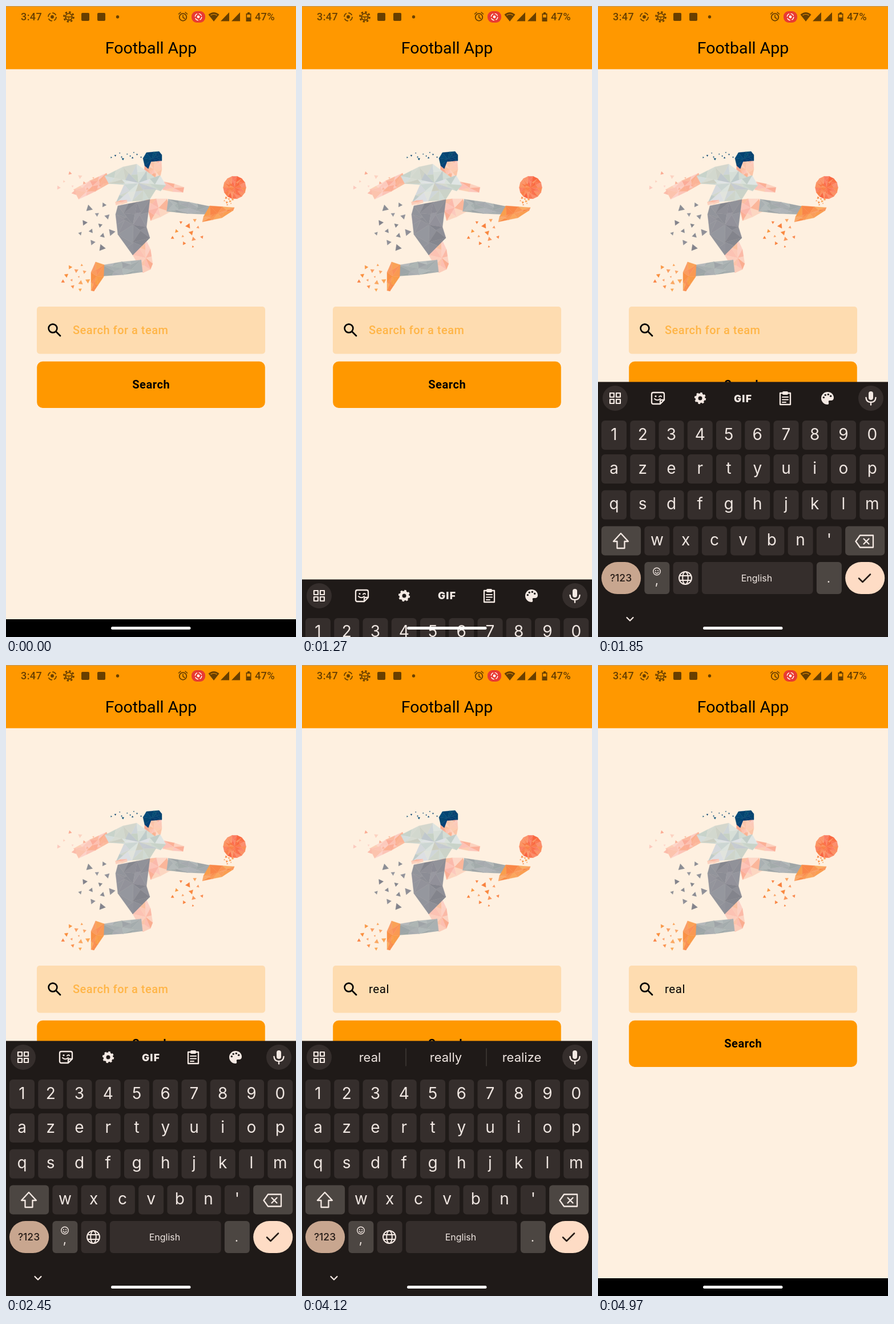
An HTML page that plays this animation: 508x1102 px, repeating every 5 s.

```html
<!DOCTYPE html>
<html lang="en">
<head>
<meta charset="utf-8">
<title>Football App</title>
<style>
html, body { margin: 0; width: 100%; height: 100%; overflow: hidden; background: #fef0e0; }
svg { display: block; width: 508px; height: 1102px; }
text { font-family: Roboto, sans-serif; white-space: pre; }
.kb text { font-family: Inter, sans-serif; fill: #efe6e1; text-anchor: middle; }
.kb .dark { fill: #251b16; }
.line { fill: none; stroke-linecap: round; stroke-linejoin: round; }
</style>
</head>
<body>
<svg id="stage" viewBox="0 0 508 1102"></svg>
<script>
const LOOP = 5000, KEYBOARD_HEIGHT = 446, SLIDE = 293, OPEN_AT = 1199, CLOSE_AT = 4510;
const INK = '#683f00', PALE = '#f4e9e3', KEY = '#352e2c', SPECIAL = '#4c4642', DARK = '#1f1a18';

const times = (n, make) => Array.from({ length: n }, (_, i) => make(i));
const rect = (x, y, w, h, r, fill) =>
  `<rect x="${x}" y="${y}" width="${w}" height="${h}" rx="${r}" fill="${fill}"/>`;
const disc = (x, y, r, fill) => `<circle cx="${x}" cy="${y}" r="${r}" fill="${fill}"/>`;
const ring = (x, y, r, color, width, dash = '') =>
  `<circle cx="${x}" cy="${y}" r="${r}" fill="none" stroke="${color}" stroke-width="${width}" stroke-dasharray="${dash}"/>`;
const line = (d, color, width) => `<path class="line" d="${d}" stroke="${color}" stroke-width="${width}"/>`;
const fill = (d, color) => `<path d="${d}" fill="${color}" fill-rule="evenodd"/>`;
const text = (x, y, size, str, attrs = '') => `<text x="${x}" y="${y}" font-size="${size}" ${attrs}>${str}</text>`;

let seed = 77;
const random = () => (seed = seed * 16807 % 2147483647) / 2147483647;
const vary = (value, spread) => value + (random() * 2 - 1) * spread;

// A tone is hue, saturation, lightness and hue spread.
const shade = ([h, s, l, spread]) => `hsl(${vary(h, spread)} ${s}% ${vary(l, l / 14)}%)`;
const SKIN = [16, 92, 83, 6], SHIRT = [140, 11, 83, 80], SHORTS = [235, 4, 57, 8], SOCK = [190, 5, 68, 20],
  SHOE = [25, 94, 65, 5], HAIR = [205, 94, 23, 4], BALL = [15, 95, 66, 5];

const polygon = (points, color) =>
  `<polygon points="${points.join(' ')}" fill="${color}" stroke="${color}" stroke-width=".4"/>`;

// Halves a triangle across its longest side until the facets are small.
function split([a, b, c], limit, tone) {
  const len = side => Math.hypot(side[0][0] - side[1][0], side[0][1] - side[1][1]);
  const [longest] = [[a, b, c], [b, c, a], [c, a, b]].sort((s, t) => len(t) - len(s));
  if (len(longest) < limit) return polygon([a, b, c], shade(tone));
  const [p, q, r] = longest, k = vary(0.5, 0.12);
  const m = [p[0] + (q[0] - p[0]) * k, p[1] + (q[1] - p[1]) * k];
  return split([p, m, r], limit, tone) + split([m, q, r], limit, tone);
}

function facets(tone, points, limit = 25) {
  const n = points.length;
  const hub = [0, 1].map(axis => points.reduce((sum, p) => sum + p[axis], 0) / n);
  return points.map((p, i) => split([hub, p, points[(i + 1) % n]], limit, tone)).join('');
}

const shape = str => str.split(' ').map(p => p.split(',').map(Number));
const blob = (x, y, r, n, turn = 0) => times(n, i =>
  [x + r * Math.cos(turn + i * 2 * Math.PI / n), y + r * Math.sin(turn + i * 2 * Math.PI / n)]);

// Tapered outline from one joint to the next, slightly swollen in the middle.
function limb(x1, y1, w1, x2, y2, w2) {
  const length = Math.hypot(x2 - x1, y2 - y1), nx = (y1 - y2) / length, ny = (x2 - x1) / length;
  const at = (k, side) => {
    const half = side * (w1 + (w2 - w1) * k + 10 * k * (1 - k)) / 2;
    return [x1 + (x2 - x1) * k + nx * half, y1 + (y2 - y1) * k + ny * half];
  };
  return [at(0, 1), at(0.5, 1), at(1, 1), at(1, -1), at(0.5, -1), at(0, -1)];
}

const shards = (tone, x, y, rx, ry, count, size) => times(count, i => {
  const angle = i * 2.4, spread = Math.sqrt((i + 0.5) / count);
  const center = [x + rx * spread * Math.cos(angle), y + ry * spread * Math.sin(angle)];
  return polygon(blob(...center, vary(size, size / 2), 3, random() * 6), shade(tone));
}).join('');

const player = () =>
  facets(SKIN, limb(180, 300, 18, 123, 329, 19)) +
  facets(SKIN, limb(276, 314, 14, 311, 321, 9)) +
  facets(SKIN, shape('243,278 251,272 272,268 273,285 270,299 262,302 242,291'), 16) +
  facets(SHIRT, shape('173,297 205,281 229,276 262,300 270,296 280,313 271,323 263,320 251,339 193,343 207,312 180,310'), 28) +
  facets(HAIR, shape('240,266 246,256 268,254 273,260 273,270 251,272 249,284 243,279'), 18) +
  facets(SKIN, limb(192, 345, 5, 212, 341, 4)) +
  facets(SKIN, limb(249, 357, 37, 285, 348, 23)) +
  facets(SKIN, shape('222,435 244,406 253,425 257,450 253,460 240,466')) +
  facets(SHORTS, shape('196,349 252,338 246,386 252,405 222,435 196,399 192,364'), 32) +
  facets(SOCK, limb(283, 348, 21, 356, 357, 14)) +
  facets(SHOE, shape('357,349 400,352 398,357 378,370 344,377 346,368')) +
  facets(SOCK, limb(170, 462, 19, 238, 454, 21)) +
  facets(SHOE, shape('157,447 172,452 171,473 154,498 149,497 149,465')) +
  facets(BALL, blob(400.5, 317, 20, 14), 18) +
  shards(HAIR, 211, 262, 31, 7, 11, 1.6) +
  shards(SKIN, 128, 309, 40, 22, 10, 3.2) +
  shards(SHORTS, 158, 383, 34, 42, 12, 4.5) +
  shards(SHOE, 318, 396, 32, 26, 12, 3.5) +
  shards(SHOE, 390, 341, 10, 7, 8, 1.6) +
  shards(SHOE, 122, 473, 27, 24, 12, 3.2);

const recordIcon = (x, y, size, color) =>
  disc(x, y, size * 0.42, color) + ring(x, y, size, color, size / 4, `${size * 1.1} ${size * 0.47}`);

const gear = (x, y, r, color, width) =>
  ring(x, y, r, color, width) + ring(x, y, r * 1.45, color, r / 2, r * 1.45 * Math.PI / 8);

const statusBar = () =>
  text(26, 25, 18, '3:47', `fill="${INK}" font-weight="500" letter-spacing=".4"`) +
  recordIcon(81, 19, 7, INK) +
  gear(110, 19, 5.8, INK, 1.8) + line('M104 19H116M110 19V25', INK, 1.3) +
  rect(132, 12, 14, 14, 2, INK) + rect(160, 12, 14, 14, 2, INK) + disc(195.5, 19, 2.7, INK) +
  ring(310, 19.5, 6.3, INK, 1.8) + line('M310 16V20L313 22M302.5 14L306 11M317.5 14L314 11', INK, 1.6) +
  rect(325, 9, 24, 20, 9, '#e83a32') + recordIcon(337, 19, 5.7, '#fff') +
  fill('M354.5 15Q364 7 373.5 15L364 27Z', INK) + line('M359 16Q364 13 369 16', '#ff9800', 1.2) +
  fill('M376 26.5L391 11V26.5ZM395 26.5L410 11V26.5Z', INK) +
  fill('M423 11H427V13H429.5V27H420.5V13H423ZM422.2 15V20H427.8V15Z', INK) +
  text(436, 25, 18.3, '47%', `fill="${INK}" font-weight="500" letter-spacing=".2"`);

const page = () =>
  rect(0, 0, 508, 1102, 0, '#fef0e0') + rect(0, 0, 508, 110.4, 0, '#ff9800') + rect(0, 0, 508, 1, 0, '#b99a6c') +
  statusBar() +
  text(254, 83, 28.5, 'Football App', 'text-anchor="middle"') +
  player() +
  rect(54, 525, 400, 82.5, 5, '#fedcb0') +
  ring(82, 563, 7.4, '#000', 2.6) + line('M88 569L95 576', '#000', 2.8) +
  '<g id="field"></g>' +
  rect(54.2, 620.7, 399.6, 81.2, 10, '#ff9800') +
  text(254.3, 668, 20, 'Search', 'font-weight="700" letter-spacing=".6" text-anchor="middle"') +
  rect(0, 1071, 508, 31, 0, '#000');

const column = i => 6 + 50.25 * i;
const rowTop = row => row ? 720.3 + 62.7 * row : 724;
const key = (col, row, span = 1, color = KEY, radius = 6) =>
  rect(column(col), rowTop(row), 50.25 * span - 6.25, row < 4 ? 51 : 56, radius, color);
const keyRow = (chars, row, first = 0) => [...chars].map((char, i) =>
  key(first + i, row) + text(column(first + i) + 22, rowTop(row) + 33.5, 28, char)).join('');

const sticker = () =>
  line('M97 675H113Q116 675 116 678V688L109 695H97Q94 695 94 692V678Q94 675 97 675ZM109 695V690Q109 688 111 688H116', PALE, 2.3) +
  disc(101, 681.5, 1.6, PALE) + line('M107 682.5Q109 680 111 682M99 686Q104 690.5 109 686', PALE, 2);
const clipboard = () =>
  line('M319 676H337V696H319Z', PALE, 2.3) + rect(323, 673, 10, 6, 2, PALE) +
  line('M323 683H333M323 687.5H333M323 692H329', PALE, 2);
const palette = () =>
  fill('M402 674A11 11 0 0 0 402 696Q405 696 404 692Q403 689 406 689H408Q413 689 413 684C413 678 408 674 402 674Z', PALE) +
  blob(402, 685, 6.8, 8, 0.2).slice(4).map(([x, y]) => disc(x, y, 1.7, DARK)).join('');

const tools = () =>
  sticker() + gear(179, 685, 6, PALE, 5) +
  text(254, 691.5, 17.5, 'GIF', 'font-weight="900" letter-spacing="1.2"') + clipboard() + palette();

const topEnds = () =>
  disc(30, 685, 22, KEY) + disc(478, 685, 22, KEY) +
  times(4, i => {
    const x = 21 + 11 * (i % 2), y = 676 + 11 * (i >> 1);
    return line(`M${x} ${y}h7v7h-7Z`, PALE, 2.2);
  }).join('') +
  rect(474, 673, 8, 15, 4, PALE) + line('M469.5 684Q470 692 478 692T486.5 684M478 692V696.5', PALE, 2.4);

const globe = () =>
  ring(153, 999, 11, PALE, 2) + line('M143.5 995H162.5M143.5 1003H162.5', PALE, 2) +
  `<ellipse cx="153" cy="999" rx="4.8" ry="11" fill="none" stroke="${PALE}" stroke-width="2"/>`;
const smiley = () =>
  ring(103, 987.5, 6.2, PALE, 1.4) + disc(101, 986, 1, PALE) + disc(105, 986, 1, PALE) +
  line('M100 989Q103 992.5 106 989', PALE, 1.3);

const keyboard = () =>
  rect(0, 656.5, 508, 470, 0, DARK) + topEnds() +
  `<g id="tools">${tools()}</g><g id="words"></g>` +
  keyRow('1234567890', 0) + keyRow('azertyuiop', 1) + keyRow('qsdfghjklm', 2) + keyRow("wxcvbn'", 3, 1.5) +
  key(0, 3, 1.5, SPECIAL) + line('M40 921L53 935H46.5V947H33.5V935H27Z', PALE, 2.3) +
  key(8.5, 3, 1.5, SPECIAL) +
  line('M459 924.5H482V945.5H459L451.5 935ZM465.5 930.5L474.5 939.5M474.5 930.5L465.5 939.5', PALE, 2.3) +
  key(0, 4, 1.5, '#c8a68f', 28) + text(40, 1005, 17.5, '?123', 'class="dark" font-weight="500"') +
  key(1.5, 4, 1, SPECIAL) + smiley() + text(103, 1010, 22, ',') +
  key(2.5, 4) + globe() +
  key(3.5, 4, 4) + text(278, 1004.5, 16, 'English') +
  key(7.5, 4, 1, SPECIAL) + text(404, 1007, 22, '.') +
  key(8.5, 4, 1.5, '#fedcc5', 28) + line('M457 999.5L463.5 1006L477 992.5', '#251b16', 2.5) +
  line('M50.5 1068L56 1073.5L61.5 1068', PALE, 2.2);

document.getElementById('stage').innerHTML = page() +
  `<g class="kb" id="keyboard">${keyboard()}</g>` + rect(184, 1084, 139.5, 5, 2.5, '#fff');

const [field, toolbar, words, board] = ['field', 'tools', 'words', 'keyboard'].map(id => document.getElementById(id));

// Start time, typed text and the two guesses beside it.
const typing = [
  [0, ''],
  [2800, 'r', 'are', 'right'],
  [3000, 're', 'really', 'red'],
  [3220, 'rea', 'really', 'real'],
  [3720, 'real', 'really', 'realize']
];

// Cubic Bézier (0.4, 0, 0.2, 1), solved by bisection.
function ease(x) {
  let lo = 0, hi = 1, s = 0.5;
  for (let i = 0; i < 20; i++) {
    s = (lo + hi) / 2;
    const at = 1.2 * s * (1 - s) ** 2 + 0.6 * s * s * (1 - s) + s ** 3;
    if (at < x) lo = s; else hi = s;
  }
  return s * s * (3 - 2 * s);
}
const progress = (t, start) => ease(Math.min(1, Math.max(0, (t - start) / SLIDE)));

let shown;
function showText(step) {
  if (step === shown) return;
  shown = step;
  const [, typed, ...guesses] = step;
  field.innerHTML = typed
    ? text(117, 573, 20.5, typed, 'letter-spacing=".6"')
    : text(117, 573, 20, 'Search for a team', 'fill="#ffb547" font-weight="500" letter-spacing=".5"');
  toolbar.style.display = typed ? 'none' : '';
  words.innerHTML = typed ? line('M182 670V700M323 670V700', '#453f3b', 1.3) +
    [typed, ...guesses].map((word, i) => text(119 + 133 * i, 692.5, 22, word)).join('') : '';
}

function render() {
  const t = performance.now() % LOOP;
  const open = progress(t, OPEN_AT) - progress(t, CLOSE_AT);
  board.setAttribute('transform', `translate(0 ${KEYBOARD_HEIGHT * (1 - open)})`);
  board.style.display = t > OPEN_AT && t < CLOSE_AT + SLIDE ? '' : 'none';
  showText(typing.filter(([start]) => start <= t).pop());
  requestAnimationFrame(render);
}
render();
</script>
</body>
</html>
```
